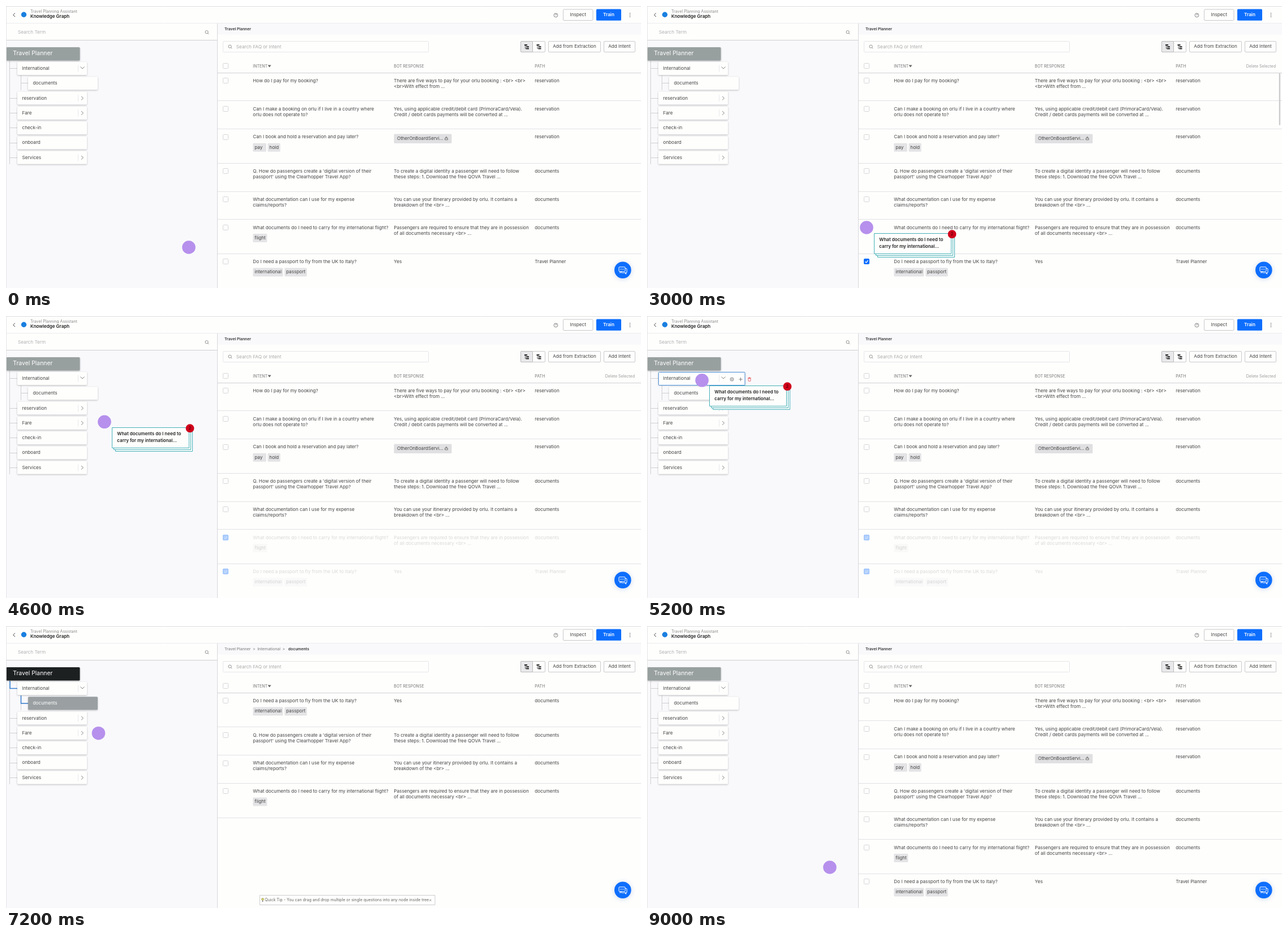
Recreate the animation shown at these times as an HTML page with a canvas. Size 1122 px wide and 499 px high, loop 9200 ms.

```html
<!DOCTYPE html>
<html lang="en">
<head>
<meta charset="utf-8">
<title>Knowledge Graph</title>
<style>
html, body { margin: 0; width: 100%; height: 100%; overflow: hidden; background: #fefefd; }
canvas { display: block; }
</style>
</head>
<body>
<canvas id="stage" width="1122" height="499"></canvas>
<script>
const ctx = document.getElementById('stage').getContext('2d', { alpha: false });
const LOOP = 9200, STEP = 200;
const WHITE = '#fefefd', PANE = '#f9f9fc', INK = '#444', GREY = '#888', BLUE = '#0d6efd', RED = '#e5484d';
const SELECT_LOW = 2000, SELECT_HIGH = 2800, DRAG = 3000, FADE = 4200, DROP = 6800, MOVED = 7200, RESET = 8800;

// time, cursor x, cursor y, distance of the dragged card
const path = [
  [0, 323, 427, 13], [1200, 386, 453, 13], [2000, 386, 453, 13], [2600, 388, 392, 13],
  [3100, 388, 392, 13], [5430, 90, 107, 13], [5600, 90, 107, 13], [6400, 113, 141, 6],
  [6800, 113, 141, 6], [7800, 259, 282, 6], [8799, 259, 282, 6], [RESET, 323, 427, 13], [LOOP, 323, 427, 13]
];

const questions = [
  { q: ['How do I pay for my booking?'], a: ['There are five ways to pay for your orlu booking : <br> <br>', '<br>With effect from ...'], path: 'reservation' },
  { q: ['Can I make a booking on orlu if I live in a country where', 'orlu does not operate to?'], a: ['Yes, using applicable credit/debit card (PrimoraCard/Vela).', 'Credit / debit cards payments will be converted at ...'], path: 'reservation' },
  { q: ['Can I book and hold a reservation and pay later?'], a: [], service: 'OtherOnBoardServi...', chips: ['pay', 'hold'], path: 'reservation' },
  { q: ["Q. How do passengers create a 'digital version of their", "passport' using the Clearhopper Travel App?"], a: ['To create a digital identity a passenger will need to follow', 'these steps: 1. Download the free QOVA Travel ...'], path: 'documents' },
  { q: ['What documentation can I use for my expense', 'claims/reports?'], a: ['You can use your itinerary provided by orlu. It contains a', 'breakdown of the <br> ...'], path: 'documents' },
  { q: ['What documents do I need to carry for my international flight?'], a: ['Passengers are required to ensure that they are in possession', 'of all documents necessary <br> ...'], chips: ['flight'], path: 'documents', checkedAt: SELECT_HIGH },
  { q: ['Do I need a passport to fly from the UK to Italy?'], a: ['Yes'], chips: ['international', 'passport'], path: 'Travel Planner', checkedAt: SELECT_LOW }
];
const movedQuestions = [{ ...questions[6], path: 'documents' }, ...questions.slice(3, 6)];
const nodes = ['International', 'documents', 'reservation', 'Fare', 'check-in', 'onboard', 'Services'];

const clamp = v => Math.max(0, Math.min(1, v));

function text(s, x, y, color = INK, size = 8.18, weight = 400, align = 'left') {
  ctx.font = `${weight} ${size}px Inter, sans-serif`;
  ctx.textAlign = align;
  ctx.textBaseline = 'middle';
  ctx.fillStyle = color;
  ctx.fillText(s, x, y);
  return ctx.measureText(s).width;
}

function box(x, y, w, h, fill, stroke, r = 0, width = 1) {
  ctx.beginPath();
  ctx.roundRect(x, y, w, h, r);
  if (fill) { ctx.fillStyle = fill; ctx.fill(); }
  if (stroke) { ctx.strokeStyle = stroke; ctx.lineWidth = width; ctx.stroke(); }
}

function disc(x, y, r, fill, stroke, width = 1) {
  box(x - r, y - r, 2 * r, 2 * r, fill, stroke, r, width);
}

function line(points, color, width = 1) {
  ctx.beginPath();
  for (let i = 0; i < points.length; i += 2) ctx.lineTo(points[i], points[i + 1]);
  ctx.strokeStyle = color;
  ctx.lineWidth = width;
  ctx.stroke();
}

function shadowed(draw, blur = 3, color = 'rgba(0,0,0,.25)') {
  ctx.save();
  ctx.shadowColor = color;
  ctx.shadowBlur = blur;
  ctx.shadowOffsetY = 1;
  draw();
  ctx.restore();
}

function magnifier(x, y) {
  disc(x - .4, y - .4, 2.6, null, '#777', .8);
  line([x + 1.5, y + 1.5, x + 3.2, y + 3.2], '#777', .9);
}

function cross(x, y, r, color) {
  line([x - r, y - r, x + r, y + r], color, .9);
  line([x - r, y + r, x + r, y - r], color, .9);
}

function plus(x, y, r, color) {
  line([x - r, y, x + r, y], color, .9);
  line([x, y - r, x, y + r], color, .9);
}

function trash(x, y) {
  box(x - 2, y - 1.5, 4, 4.8, null, RED, .5, .8);
  line([x - 3, y - 2.2, x + 3, y - 2.2], RED, .9);
  line([x - 1, y - 3.2, x + 1, y - 3.2], RED, .8);
}

function checkbox(y, checked) {
  const top = Math.floor(y - 5) + .5;
  box(383.5, top, 9, 9, checked ? BLUE : WHITE, checked ? BLUE : '#d6d6d8', 1);
  if (checked) line([385.6, top + 4.7, 387.4, top + 6.6, 390.6, top + 2.7], '#fff', 1.3);
}

function treeIcon(x) {
  box(x - 4, 68, 5, 2, '#222');
  box(x - 1, 71.2, 5, 2, '#222');
  box(x - 1, 74.4, 5, 2, '#222');
  line([x - 2.5, 70, x - 2.5, 75.4, x - 1, 75.4], '#222', .7);
}

function header() {
  line([0, .5, 1122, .5], '#ddd');
  line([0, 30.5, 1122, 30.5], '#ececee');
  line([16, 12.5, 12.7, 15.8, 16, 19], '#444', 1);
  disc(31.5, 15.3, 4.7, '#1a7fe0');
  text('Travel Planning Assistant', 43, 10.3, '#8a8a8a', 7);
  text('Knowledge Graph', 43, 18.8, '#222', 8, 600);
  disc(971.5, 16.3, 3.4, null, '#666', .8);
  text('?', 971.5, 16.5, '#555', 5, 500, 'center');
  box(984.5, 6, 52.5, 19.5, WHITE, '#c8c8ca', 1.5);
  text('Inspect', 1010.7, 15.8, INK, 8.18, 400, 'center');
  box(1043, 5.6, 44, 20.2, BLUE, null, 1.5);
  text('Train', 1065, 15.8, '#fff', 8.18, 600, 'center');
  for (const y of [13, 16, 19]) disc(1102.5, y, .8, '#555');
}

function tree(moved, hovered) {
  box(0, 31, 373, 468, PANE);
  box(0, 31, 373, 29, WHITE);
  line([0, 60.5, 373, 60.5], '#cfcfd1');
  text('Search Term', 21, 46.5, '#b0b0b2');
  magnifier(355, 46.5);

  line([6.5, 97, 6.5, 280], '#cfcfd2');
  line([26.5, 123, 26.5, 149], '#cfcfd2');
  nodes.forEach((name, i) => {
    const y = Math.floor(110.5 + 26.3 * i) + .5, indent = name === 'documents' ? 19 : 0;
    line([6.5 + indent * 1.05, y, 20 + indent, y], '#cfcfd2');
  });
  if (moved) {
    line([7, 97, 7, 110.5, 20, 110.5], '#3a80cf', 1.6);
    line([26.5, 123, 26.5, 137, 39, 137], '#3a80cf', 1.6);
  }
  shadowed(() => box(.5, 73, 130, 23.5, moved ? '#1d2021' : '#98a09f', null, 1.5));
  text('Travel Planner', 12.3, 84.2, '#fff', 10.4);

  nodes.forEach((name, i) => {
    const y = 110.5 + 26.3 * i, child = name === 'documents', x = child ? 39 : 20;
    const active = name === hovered, chosen = child && moved;
    const w = active ? 153.5 : 123;
    shadowed(() => box(x, y - 11.5, w, 23, chosen ? '#9aa0a2' : WHITE, null, 1.5));
    if (active) box(x + .5, Math.round(y - 11.5) + .5, w - 1, 23, null, '#4a90d9', 1);
    text(name, x + 8.6, y, chosen ? '#fff' : INK);
    if (['International', 'reservation', 'Fare', 'Services'].includes(name)) {
      line([127.5, y - 6, 127.5, y + 6], '#e8e8ea');
      line(i ? [133, y - 3.3, 136.5, y, 133, y + 3.3] : [131.5, y - 3, 135, y + .5, 138.5, y - 3], '#777', .9);
    }
    if (active) {
      disc(x + 130, y + 1.5, 3, null, '#777', .9);
      disc(x + 130, y + 1.5, 1.1, null, '#777', .7);
      plus(x + 145.5, y + 1.5, 3.2, '#777');
      trash(x + 161, y + 1.5);
    }
  });
}

function addLink(label, x, y) {
  plus(x + 3, y, 2.5, '#2b6fe0');
  return text(label, x + 9, y, '#2b6fe0', 6.8, 600);
}

function row(item, top, height, t, hovered, moved) {
  const y = top + 14.4;
  const checked = !moved && t < RESET && t >= item.checkedAt;
  const faded = checked && t >= FADE;
  if (hovered) box(374, top, 748, height, '#f0f0f3');
  ctx.globalAlpha = faded ? .32 : 1;
  checkbox(y, checked);
  ctx.globalAlpha = faded ? .2 : 1;
  item.q.forEach((s, i) => text(s, 436.3, y + 10 * i));
  item.a.forEach((s, i) => text(s, 685.3, y + 10 * i));
  text(item.path, 934.3, y);
  if (item.service) {
    box(685.5, y - 5.5, 102, 16.5, '#e0e0e2', null, 1.5);
    text(item.service, 691, y + 3, INK, 8.1);
    box(775.5, y + 1.8, 5, 3, null, '#555', .5, .8);
    line([776.5, y + 1.5, 778, y - .8, 779.5, y + 1.5], '#555', .8);
  }
  let x = 436.3;
  for (const chip of item.chips || []) {
    ctx.font = '8.18px Inter, sans-serif';
    const w = chip === 'pay' ? 23.5 : ctx.measureText(chip).width + 5.5;
    box(x, y + 10.8, w, 15, '#e4e4e6', null, 1.5);
    text(chip, x + 2.9, y + 18.2);
    x += w + 2.6;
  }
  ctx.globalAlpha = 1;
  if (hovered) {
    const w = addLink('Add Alternate FAQ', 436.5, y + 37.3);
    addLink('Add Synonyms', 453 + w, y + 37.3);
    addLink('Add Alternate Response', 685.5, y + 7 + 10 * item.a.length);
    line([1060.2, y + 3, 1064.8, y - 1.8], '#555', 1.8);
    trash(1080, y);
  }
  const bottom = Math.floor(top + height) + .5;
  line([374, bottom, 1122, bottom], '#e2e2e4');
}

function table(t, moved, cursor, dragging) {
  box(374, 31, 748, 19.5, PANE);
  line([373.5, 31, 373.5, 499], '#d8d8dc');
  if (moved) {
    text('Travel Planner  >  International  >', 386, 41.3, '#888', 6.8, 500);
    box(497, 34, 45, 14, PANE);
    text('documents', 498.8, 41.3, '#333', 6.8, 600);
  } else {
    text('Travel Planner', 386, 41.3, '#333', 6.8, 600);
  }
  box(383.5, 62.5, 363, 19, WHITE, '#e6e6e9', 1);
  magnifier(396, 72);
  text('Search FAQ or Intent', 406.8, 72.3, '#aaa');
  box(909.5, 62.5, 43, 19, WHITE, '#cacacc', 1.5);
  box(909.5, 62.5, 21, 19, '#e9e9eb', '#bbb', 1.5);
  treeIcon(920);
  treeIcon(941.5);
  box(958.5, 62.5, 92, 19, WHITE, '#cacacc', 1.5);
  text('Add from Extraction', 1004.5, 72, INK, 8.1, 400, 'center');
  box(1056.5, 62.5, 55, 19, WHITE, '#cacacc', 1.5);
  text('Add Intent', 1084, 72, INK, 8.1, 400, 'center');

  checkbox(106.7, false);
  text('INTENT', 436.3, 106.7, GREY, 7, 500);
  ctx.beginPath();
  ctx.moveTo(462.5, 104.5); ctx.lineTo(468.5, 104.5); ctx.lineTo(465.5, 108.5);
  ctx.fillStyle = '#666';
  ctx.fill();
  text('BOT RESPONSE', 685.3, 106.7, GREY, 7, 500);
  text('PATH', 934.3, 106.7, GREY, 7, 500);
  if (t >= SELECT_LOW && t < MOVED) text('Delete Selected', 1058.8, 106.7, '#999', 7);

  let top = 118.2;
  for (const item of moved ? movedQuestions : questions) {
    const height = item.chips ? 60.7 : 49.7;
    const hovered = !dragging && t < DROP && cursor.x > 374 && cursor.y >= top && cursor.y < top + height;
    row(item, top, height, t, hovered, moved);
    top += height;
  }
  line([374, 118.5, 1122, 118.5], '#cfcfd1', 1.2);

  const bar = t < DRAG ? +(cursor.x > 374) : t < FADE ? clamp((3800 - t) / 900) : 0;
  ctx.globalAlpha = bar;
  box(1116.7, 119, 2.4, 92, '#c6c6c8', null, 1.2);
  ctx.globalAlpha = 1;
}

function chatButton() {
  shadowed(() => disc(1089.8, 467.3, 14.8, BLUE), 8, 'rgba(60,100,180,.25)');
  box(1087, 464.5, 10, 7.5, BLUE, '#fff', 1, 1);
  line([1093.5, 472, 1095.5, 474.5, 1095.5, 472], '#fff', 1);
  box(1083, 461.8, 11, 8, BLUE, '#fff', 1, 1);
  line([1085, 470, 1085, 472.5, 1087.5, 470], '#fff', 1);
  for (const x of [1086, 1088.5, 1091]) disc(x, 465.8, .8, '#fff');
}

function card(cardX, cardY) {
  const x = Math.round(cardX), y = Math.round(cardY);
  for (const d of [6, 3, 0]) box(x + .5 + d, y + .5 + d, 136, 36, WHITE, '#45b0b8');
  text('What documents do I need to', x + 9.3, y + 12, '#222', 8, 600);
  text('carry for my international...', x + 9.3, y + 23.8, '#222', 8, 600);
  disc(x + 138, y + 1.7, 7.4, '#d0021b');
  text('2', x + 138, y + 2, '#400', 7, 500, 'center');
}

function toast(alpha) {
  ctx.globalAlpha = alpha;
  shadowed(() => box(958.5, 12.5, 151.5, 22, '#e9f4ec', '#b4d8bd', 1.5), 4, 'rgba(0,0,0,.15)');
  disc(970, 23, 3.4, null, '#4d8a5c', .8);
  line([968.4, 23, 969.6, 24.3, 971.8, 21.7], '#4d8a5c', .8);
  text('Faqs moved successfully', 981, 23.2, '#5f7566', 7);
  cross(1097.5, 23.6, 2.8, '#555');
  ctx.globalAlpha = 1;
}

function tip() {
  box(448.5, 476.5, 309.5, 17, WHITE, '#cdcdcf');
  disc(453.5, 483.5, 2, '#d9d36a', '#8a8a4a', .6);
  line([453.5, 486, 453.5, 488], '#666', 1.4);
  text('Quick Tip - You can drag and drop multiple or single questions into any node inside tree', 457.3, 485, '#666', 7);
  cross(749.8, 485.3, 1.6, '#888');
}

function cursorAt(t) {
  const i = path.findIndex(key => key[0] > t);
  const a = path[i - 1], b = path[i];
  const k = (1 - Math.cos(Math.PI * (t - a[0]) / (b[0] - a[0]))) / 2;
  const [, x, y, gap] = a.map((v, n) => v + (b[n] - v) * k);
  return { x, y, gap };
}

function draw(t) {
  const cursor = cursorAt(t);
  const moved = t >= MOVED && t < RESET, dragging = t >= DRAG && t < DROP;
  const overTree = dragging && cursor.x < 150;
  const hovered = overTree && (cursor.y < 123 ? 'International' : cursor.y < 149 && 'documents');

  box(0, 0, 1122, 499, WHITE);
  header();
  tree(moved, hovered);
  table(t, moved, cursor, dragging);
  line([.5, 0, .5, 499], '#e4e4e6');
  chatButton();
  if (moved) {
    tip();
    toast(clamp((t - 7200) / 600));
  }
  if (dragging) card(cursor.x + cursor.gap, cursor.y + cursor.gap - 3.5);
  disc(cursor.x, cursor.y, 11.8, '#b690ec');
  for (const click of [1800, 2600]) {
    const age = t - click;
    if (age >= 0 && age < 400) disc(cursor.x, cursor.y, 2.8 + age / 60, `rgba(232,218,252,${.9 - age / 500})`);
  }
}

function tick(now) {
  draw(Math.floor(now % LOOP / STEP) * STEP);
  requestAnimationFrame(tick);
}
requestAnimationFrame(tick);
</script>
</body>
</html>
```
